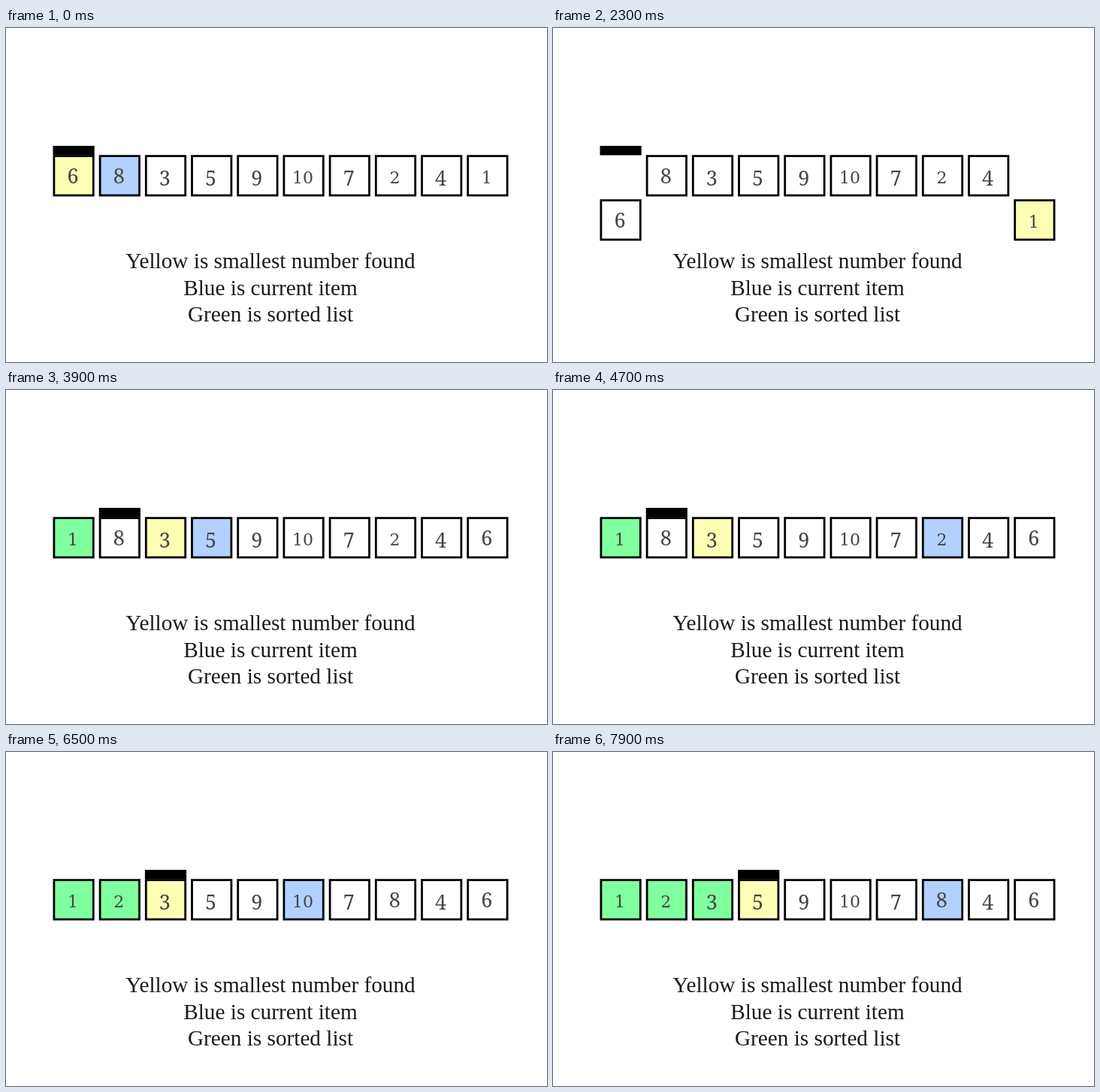
Recreate the animation shown at these times as an HTML page. Size 720 px wide and 445 px high, loop 8000 ms.

```html
<!DOCTYPE html>
<html lang="en">
<head>
<meta charset="utf-8">
<title>Selection sort</title>
<style>
  html, body { margin: 0; width: 100%; height: 100%; overflow: hidden; background: #fff; }
  svg { display: block; width: 720px; height: 445px; }
  text { text-anchor: middle; }
  .legend { font: 29.25px "Liberation Serif", serif; fill: #1a1a1a; }
  .tile rect { stroke: #000; stroke-width: 2.8; }
  .tile text { font: 27px "Noto Serif", serif; fill: #444; }
  .tile .short { font: 22px "DejaVu Serif", serif; }
</style>
</head>
<body>
<svg id="stage" viewBox="0 0 720 445">
  <rect id="bar" y="157" width="55.2" height="12.5"/>
  <g class="legend">
    <text x="352" y="320">Yellow is smallest number found</text>
    <text x="352" y="355.5">Blue is current item</text>
    <text x="352" y="391">Green is sorted list</text>
  </g>
</svg>
<script>
const LOOP = 8000;
const STEP = 200;
const LONG_STEP = 300;
const STRIDE = 3; // slots a swapped tile travels per step
const NONE = -1;
const COLOR = { plain: '#fff', min: '#fcffb4', current: '#b3d1ff', sorted: '#80ff9f' };
const values = [6, 8, 3, 5, 9, 10, 7, 2, 4, 1];

const stage = document.getElementById('stage');
const bar = document.getElementById('bar');
const slotX = slot => 62.5 + 61.2 * slot;
const rowY = row => 169.2 + 59 * row;

function add(parent, tag, attrs) {
  const node = document.createElementNS(stage.namespaceURI, tag);
  for (const key in attrs) node.setAttribute(key, attrs[key]);
  return parent.appendChild(node);
}

const tiles = values.map(value => {
  const group = add(stage, 'g', { class: 'tile' });
  const box = add(group, 'rect', { x: 1.4, y: 1.4, width: 52.4, height: 52.4 });
  // Old-style figures: some stay at x-height, some hang below the line
  const label = add(group, 'text', {
    x: 26.5,
    y: /[34579]/.test(value) ? 41 : 38.3,
    class: /^[012]+$/.test(value) ? 'short' : 'tall'
  });
  label.textContent = value;
  return { value, group, box };
});

// Runs the sort and records every state it shows
function recordSort(list) {
  const steps = [];
  const last = list.length - 1;
  const state = { bar: 0, sorted: 0, min: 0, current: NONE };
  let clock = 0;

  function show(change, hold = STEP, moved = {}) {
    Object.assign(state, change);
    steps.push({ ...state, list: [...list], moved, time: clock });
    clock += hold;
  }

  function swap(from, to) {
    const [left, right] = [list[from], list[to]];
    const count = Math.round((to - from) / STRIDE);
    for (let i = 0; i <= count; i++) {
      const travel = (to - from) * i / count;
      const a = from + travel;
      const b = to - travel;
      const meeting = Math.abs(a - b) < 1;
      show({ current: NONE }, STEP, { [left]: a, [right]: meeting ? a + 1.05 : b });
    }
    [list[from], list[to]] = [right, left];
    show({ min: from });
  }

  for (let pass = 0; clock < LOOP; pass++) {
    const slow = pass === 0;
    Object.assign(state, { bar: pass, sorted: pass, min: pass });
    if (pass === 1) show({ current: NONE });

    for (let current = pass + 1; current <= last; current++) {
      const found = list[current - 1] < list[state.min];
      const min = found ? current - 1 : state.min;
      // The last check is skipped when the pass has nothing to swap
      if (current === last && min === pass) break;
      show({ current, min }, slow && found ? LONG_STEP : STEP);
    }
    if (list[last] < list[state.min]) show({ current: NONE, min: last }, LONG_STEP);
    if (state.min !== pass) swap(pass, state.min);
    if (slow) show({ sorted: 1, min: NONE });
  }
  return steps;
}

const steps = recordSort([...values]);

function slotColor(slot, step) {
  if (slot === step.min) return COLOR.min;
  if (slot < step.sorted) return COLOR.sorted;
  return slot === step.current ? COLOR.current : COLOR.plain;
}

function draw(time) {
  const step = steps.findLast(({ time: start }) => start <= time);
  bar.setAttribute('x', slotX(step.bar));
  for (const { value, group, box } of tiles) {
    const home = step.list.indexOf(value);
    const lowered = value in step.moved;
    const slot = lowered ? step.moved[value] : home;
    group.setAttribute('transform', `translate(${slotX(slot)} ${rowY(lowered ? 1 : 0)})`);
    box.setAttribute('fill', slotColor(home, step));
  }
}

const began = performance.now();
function tick() {
  draw((performance.now() - began) % LOOP);
  requestAnimationFrame(tick);
}
tick();
</script>
</body>
</html>
```
